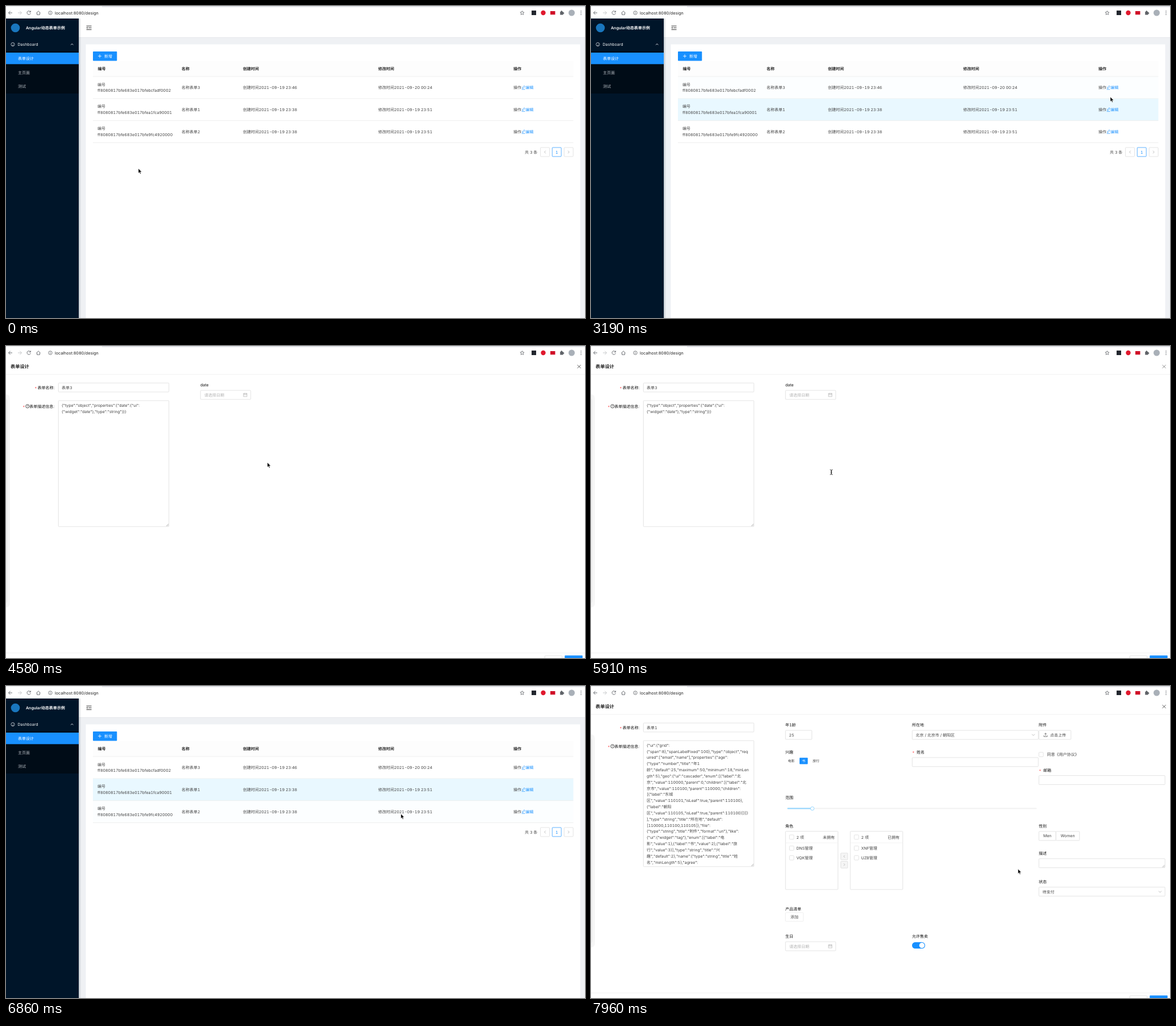
Animation, 1019 px wide and 549 px high, one loop 8 s. Source, as an HTML page:

```html
<!DOCTYPE html>
<html lang="zh-CN">
<head>
<meta charset="utf-8">
<title>表单设计</title>
<style>
html, body { margin: 0; width: 100%; height: 100%; overflow: hidden; background: #fff; }
svg { display: block; width: 100%; height: 100%; }
text {
  font-family: Inter, "Noto Sans CJK SC", "Noto Sans CJK", sans-serif;
  font-variant-numeric: tabular-nums;
  text-rendering: geometricPrecision;
  white-space: pre;
}
</style>
</head>
<body>
<svg id="stage" viewBox="0 0 1019 549"></svg>
<script>
const BLUE = '#1890ff', INK = '#111', BODY = '#444', PALE = '#b0b0b0', EDGE = '#d9d9d9';

// Drawing helpers: each returns SVG markup; text is placed by its vertical centre.
const text = (x, y, s, { fill = BODY, size = 7, weight = 400, anchor = 'start' } = {}) =>
  `<text x="${x}" y="${y + size * .36}" fill="${fill}" font-size="${size}" font-weight="${weight}" text-anchor="${anchor}">${s}</text>`;
const rect = (x, y, w, h, fill, extra = '') =>
  `<rect x="${x}" y="${y}" width="${w}" height="${h}" fill="${fill}" ${extra}/>`;
const box = (x, y, w, h, fill = '#fff', edge = EDGE) =>
  rect(x + .3, y + .3, w - .6, h - .6, fill, `stroke="${edge}" stroke-width=".7" rx="1"`);
const line = (d, stroke = '#5f6368', width = .9) =>
  `<path d="${d}" fill="none" stroke="${stroke}" stroke-width="${width}"/>`;
const circle = (x, y, r, fill, extra = '') => `<circle cx="${x}" cy="${y}" r="${r}" fill="${fill}" ${extra}/>`;
const ring = (x, y, r, stroke, width = .8) => circle(x, y, r, 'none', `stroke="${stroke}" stroke-width="${width}"`);
const group = (id, content) => `<g id="${id}">${content}</g>`;

const bold = { weight: 600, fill: '#222' };
const label = (x, y, s) => text(x, y, s, { fill: INK });
const required = (x, y, s, gap = 8) => text(x, y + 1, '*', { fill: '#ff4d4f' }) + label(x + gap, y, s);
const chevron = (x, y) => line(`M${x - 2.5} ${y - 1.3}l2.5 2.6 2.5 -2.6`, PALE, .8);
const grip = (x, y) => line(`M${x - 5} ${y - 1}l4 -4M${x - 2.8} ${y - 1}l1.8 -1.8`, '#888', .6);
const button = (x, y, w, h, s) => box(x, y, w, h) + text(x + w / 2, y + h / 2, s, { anchor: 'middle' });
const datePicker = (x, y) => box(x, y, 89, 16.5) + text(x + 7, y + 8.3, '请选择日期', { fill: PALE }) +
  rect(x + 76, y + 5.8, 6, 5.4, 'none', `stroke="${PALE}" stroke-width=".7"`) +
  line(`M${x + 76} ${y + 7.8}h6M${x + 77.5} ${y + 4.8}v2M${x + 80.5} ${y + 4.8}v2`, PALE, .7);

function browserBar() {
  const grey = '#5f6368';
  return rect(0, 0, 1019, 22, '#fff') + rect(0, 0, 169, .8, '#dee1e6') + rect(169, 0, 850, 2, '#dee1e6') +
    line('M11 12H4.5M7.7 8.8L4.5 12l3.2 3.2') +
    line('M21 12h6.5M24.3 8.8l3.2 3.2l-3.2 3.2', '#c0c2c5') +
    line('M42.8 10a3.2 3.2 0 1 0 .5 2.7M43.4 8.3v2.4h-2.6') +
    line('M53.5 12.2l3.5 -3.4 3.5 3.4M54.6 11.5v3.8h4.8v-3.8') +
    ring(78, 12, 3.2, grey) + line('M78 11.5v2.2M78 10v.8') +
    text(86, 12, 'localhost:8080/design', { size: 7.2, fill: '#222' }) +
    line('M908.4 8.6l1 2.3 2.5 .2 -1.9 1.7 .6 2.5 -2.2 -1.3 -2.2 1.3 .6 -2.5 -1.9 -1.7 2.5 -.2z', grey, .8) +
    rect(925, 8, 8, 8, '#22262e') + circle(945.5, 12, 4.2, '#e0182d') + rect(958, 9, 8.5, 6.2, '#d01028') +
    rect(975.2, 10, 5.4, 5.6, grey, 'rx=".6"') + circle(977.8, 9.6, 1.3, grey) + circle(981, 12.6, 1.3, grey) +
    circle(995.5, 12, 5.5, '#a9b0b8') +
    [9, 12, 15].map(y => circle(1012, y, .8, grey)).join('');
}

function sidebar() {
  return rect(0, 22, 128, 527, '#001529') + circle(16.5, 38.5, 7.8, '#1976bd') +
    text(35, 38.5, 'Angular动态表单示例', { fill: '#fff', weight: 600 }) +
    ring(12, 67.5, 3.1, '#d5d9dd') + line('M12 68l1.4 -1.4M10.5 69.7h3', '#d5d9dd', .7) +
    text(20.5, 67.5, 'Dashboard', { fill: '#f4f5f6' }) + line('M114.2 68.5l2 -2 2 2', '#fff') +
    rect(0, 80, 128, 74, '#000c17') + rect(0, 82, 128, 20.3, BLUE) +
    text(21, 92, '表单设计', { fill: '#fff' }) +
    text(21, 117, '主页面', { fill: '#b4bac0' }) +
    group('menuHover', text(21, 117, '主页面', { fill: '#fff' })) +
    text(21, 141.5, '测试', { fill: '#b4bac0' });
}

function tableRow([name, id, created, modified], i) {
  const top = 124.3 + i * 38.8, y = top + 19.3;
  return rect(153, top, 845.5, 38.5, '#e6f7ff', `id="row${i}"`) +
    text(161, y - 5.6, '编号') + text(161, y + 5.3, id) + text(309, y, '名称' + name) +
    text(417, y, '创建时间' + created) + text(655, y, '修改时间' + modified) + text(893, y, '操作') +
    line(`M907.5 ${y + 3.2}h6M908.5 ${y + 1.3}l.3 -1.5 3.2 -3.2 1.4 1.4 -3.2 3.2z`, BLUE, .7) +
    text(914.3, y, '编辑', { fill: BLUE }) + rect(153, top + 38.3, 845.5, .7, '#e8e8e8');
}

function listPage() {
  const rows = [
    ['表单3', 'ff8080817bfe683e017bfebcfadf0002', '2021-09-19 23:46', '2021-09-20 00:24'],
    ['表单1', 'ff8080817bfe683e017bfea1fca90001', '2021-09-19 23:38', '2021-09-19 23:51'],
    ['表单2', 'ff8080817bfe683e017bfe9fc4920000', '2021-09-19 23:38', '2021-09-19 23:51']];
  const heads = [[161.5, '编号'], [309, '名称'], [417, '创建时间'], [655, '修改时间'], [893, '操作']];
  return rect(128, 22, 891, 527, '#eff1f4') + rect(128, 22, 891, 33, '#fff') + rect(128, 55, 891, .8, '#e4e7ea') +
    line('M141.5 35.2h9M145 38.4h5.5M141.5 41.6h9', '#333', 1) +
    '<path d="M143.6 36.8v3.2l-2.2 -1.6z" fill="#333"/>' +
    rect(140.5, 67.5, 870, 482, '#fff') + rect(153, 80, 42.3, 16.4, BLUE, 'rx="1"') +
    line('M162 88.2h6M165 85.2v6', '#fff', .8) + text(173, 88.2, '新增', { fill: '#fff' }) +
    rect(153, 97, 845.5, 27, '#fdfdfd') + heads.map(([x, s]) => text(x, 110.3, s, bold)).join('') +
    rect(153, 123.7, 845.5, .7, '#e8e8e8') + rows.map(tableRow).join('') +
    text(913, 257, '共 3 条') + box(940.3, 248.7, 16.5, 16.5) + box(961, 248.7, 16.5, 16.5, '#fff', BLUE) +
    box(982, 248.7, 16.5, 16.5) + line('M949.8 254.6l-2.2 2.4 2.2 2.4', PALE, .8) +
    line('M989 254.6l2.2 2.4 -2.2 2.4', PALE, .8) +
    text(969.2, 257, '1', { fill: BLUE, anchor: 'middle' }) +
    '<rect x="128" y="22" width="4" height="527" fill="url(#shade)"/>' + sidebar();
}

const jsonLines = lines =>
  lines.map((s, i) => text(98, 104.2 + i * 10.84, s, { size: 6.9 })).join('');

const dateForm = () => text(98, 73, '表单3') +
  jsonLines(['{"type":"object","properties":{"date":{"ui":', '{"widget":"date"},"type":"string"}}}']) +
  label(342, 68.3, 'date') + datePicker(342, 77.8);

function transferList(x, title, items) {
  const check = y => box(x + 7, y - 4.3, 8.3, 8.3);
  return box(x, 255.4, 93, 103) + rect(x, 275.7, 93, .6, '#ececec') +
    check(266) + text(x + 19.5, 266, '2 项') + text(x + 87, 266, title, { anchor: 'end' }) +
    items.map((s, i) => check(285.5 + i * 17) + text(x + 19.5, 285.5 + i * 17, s)).join('');
}

function fullForm() {
  return text(98, 73, '表单1') + jsonLines([
    '{"ui":{"grid":',
    '{"span":8},"spanLabelFixed":100},"type":"object","req',
    'uired":["email","name"],"properties":{"age":',
    '{"type":"number","title":"年1',
    '龄","default":25,"maximum":50,"minimum":18,"minLen',
    'gth":5},"geo":{"ui":"cascader","enum":[{"label":"北',
    '京","value":110000,"parent":0,"children":[{"label":"北',
    '京市","value":110100,"parent":110000,"children":',
    '[{"label":"东城',
    '区","value":110101,"isLeaf":true,"parent":110100},',
    '{"label":"朝阳',
    '区","value":110105,"isLeaf":true,"parent":110100}]}]}',
    '],"type":"string","title":"所在地","default":',
    '[110000,110100,110105]},"file":',
    '{"type":"string","title":"附件","format":"uri"},"like":',
    '{"ui":{"widget":"tag"},"enum":[{"label":"电',
    '影","value":1},{"label":"书","value":2},{"label":"旅',
    '行","value":3}],"type":"string","title":"兴',
    '趣","default":2},"name":{"type":"string","title":"姓',
    '名","minLength":5},"agree":']) +
    label(342, 68.3, '年1龄') + box(342, 77.8, 47, 16.5) + text(348.5, 86, '25') +
    label(565, 68.3, '所在地') + box(565, 77.8, 222.5, 16.5) + text(571.5, 86, '北京 / 北京市 / 朝阳区') + chevron(778.5, 86) +
    label(788, 68.3, '附件') + box(788, 77.8, 57, 16.5) + text(808, 86, '点击上传') +
    line('M797 87v2h6v-2M800 87.5v-4.5M798.2 84.6l1.8 -1.8 1.8 1.8', BODY, .7) +
    label(342, 116.5, '兴趣') + text(346.5, 131.9, '电影', { size: 6 }) +
    rect(367, 126.2, 14.5, 11.3, BLUE, 'rx="1"') + text(371.2, 131.9, '书', { size: 6, fill: '#fff' }) +
    text(390, 131.9, '旅行', { size: 6 }) +
    required(565, 116.5, '姓名') + box(565, 125.6, 222.5, 16.5) +
    box(788, 116.4, 8.3, 8.3) + text(802.5, 120.5, '同意《用户协议》') +
    required(788, 148, '邮箱') + box(788, 157.3, 222.5, 16.5) +
    label(342, 196, '范围') + rect(345.5, 214.6, 439, 2, '#f2f2f2', 'rx="1"') +
    rect(345.5, 214.6, 44, 2, '#91d5ff', 'rx="1"') + circle(389.5, 215.6, 3.1, '#fff', 'stroke="#91d5ff"') +
    label(342, 246, '角色') + transferList(342, '未拥有', ['DNS管理', 'VQK管理']) +
    transferList(456, '已拥有', ['XNF管理', 'UZB管理']) +
    box(439.3, 293.6, 12.8, 12.5, '#f5f5f5') + box(439.3, 308.2, 12.8, 12.5, '#f5f5f5') +
    line('M446.6 297.8l-1.9 2 1.9 2M444.8 312.4l1.9 2 -1.9 2', PALE, .8) +
    label(788, 246, '性别') + button(788, 255.6, 30.5, 16.5, 'Men') + button(818, 255.6, 42, 16.5, 'Women') +
    label(788, 294, '描述') + box(788, 303.5, 222.5, 16.5) + grip(1010.5, 320) +
    label(788, 344, '状态') + box(788, 353.6, 222.5, 16.5) + text(794.5, 362, '待支付') + chevron(1001.5, 362) +
    label(342, 392, '产品清单') + box(342, 398.4, 32, 16, '#fff', '#e8e8e8') + text(358, 406.5, '添加', { anchor: 'middle' }) +
    label(342, 440.3, '生日') + datePicker(342, 449.7) +
    label(565, 440.3, '允许售卖') + rect(565, 450.8, 23, 11.3, BLUE, 'rx="5.6"') + circle(582.3, 456.4, 4.6, '#fff');
}

function modal() {
  return rect(-5, 21.8, 1029, 545.4, '#fff', 'rx="1.5"') + text(8, 36, '表单设计', { ...bold, size: 8.2 }) +
    line('M1005.6 33.2l6 6M1011.6 33.2l-6 6', '#000', .8).replace('<path', '<path id="close"') +
    rect(-5, 49.7, 1029, .7, '#ebebeb') + rect(-5, 539.7, 1029, .7, '#ebebeb') +
    button(948, 544.6, 31, 16.7, '取消') + rect(983.3, 544.6, 31.4, 16.7, BLUE, 'rx="1"') +
    text(998.8, 553.2, '确定', { fill: '#fff', anchor: 'middle' }) +
    required(50, 73, '表单名称:', 5.5) + box(92, 64.8, 195, 16.4) +
    text(29, 107, '*', { fill: '#ff4d4f' }) + ring(37.8, 106, 3.1, INK, .7) +
    text(37.8, 106, '?', { size: 5, fill: INK, anchor: 'middle' }) + label(41.2, 106, '表单描述信息:') +
    box(92, 95.8, 195, 222.3) + grip(287, 318) +
    group('dateForm', dateForm()) + group('fullForm', fullForm());
}

const stage = document.getElementById('stage');
stage.innerHTML = `<defs><linearGradient id="shade"><stop stop-color="#001529" stop-opacity=".2"/>
  <stop offset="1" stop-color="#001529" stop-opacity="0"/></linearGradient></defs>` +
  listPage() + rect(0, 22, 1019, 527, '#000', 'id="mask"') + group('modal', modal()) +
  group('edgeShade', rect(-10, 85, 17, 375, '#000', 'rx="7" opacity=".035"') + rect(-10, 92, 13, 361, '#000', 'rx="5" opacity=".025"')) +
  browserBar() +
  group('arrow', '<path d="M0 0v8.2l1.9 -1.7 1.3 2.9 1.3 -.6 -1.3 -2.8h2.6z" fill="#000" stroke="#fff" stroke-width=".5"/>') +
  group('beam', line('M-2.4 -4.3q2.4 0 2.4 1.2v6.2q0 1.2 -2.4 1.2M2.4 -4.3q-2.4 0 -2.4 1.2v6.2q0 1.2 2.4 1.2M-1.2 0h2.4', '#222', .9));

const el = id => document.getElementById(id);
const parts = Object.fromEntries(['menuHover', 'row0', 'row1', 'row2', 'mask', 'modal', 'close',
  'dateForm', 'fullForm', 'edgeShade', 'arrow', 'beam'].map(id => [id, el(id)]));
const ramp = (t, start, length) => Math.min(1, Math.max(0, (t - start) / length));
const fade = (t, on, off) => ramp(t, on, 300) - ramp(t, off, 300);
const opacity = (id, v) => parts[id].setAttribute('opacity', v);

// The screen refreshes about every 150 ms, in bursts of [start, end, steps].
const BURSTS = [[150, 950, 6], [1390, 2420, 8], [2570, 3480, 7], [3630, 4580, 7],
  [4730, 5770, 8], [5910, 6860, 7], [7010, 7960, 7]];
function refreshTime(t) {
  const burst = BURSTS.filter(b => b[0] <= t).pop();
  if (!burst) return 0;
  const [start, end, steps] = burst;
  return t >= end ? end : start + 150 * Math.min(steps - 2, Math.floor((t - start) / 150));
}

const POINTER = [[0, 233, 286], [150, 222, 274], [500, 120, 170], [950, 60, 108], [1390, 75, 104],
  [1900, 480, 96], [2420, 914, 138], [2570, 914, 142], [2870, 916, 172], [3020, 915, 170],
  [3170, 914, 160], [3480, 913, 141], [3780, 905, 143], [3930, 767, 158], [4580, 460, 205],
  [4730, 400, 215], [5100, 338, 226], [5770, 400, 224], [5910, 423, 222], [6060, 780, 204],
  [6360, 905, 185], [6560, 914, 179], [6710, 880, 190], [6860, 695, 225], [7160, 640, 270], [7960, 751.5, 322]];
function pointerAt(t) {
  const i = Math.max(1, POINTER.findIndex(k => k[0] >= t));
  const [a, b] = [POINTER[i - 1], POINTER[i]];
  const u = ramp(t, a[0], b[0] - a[0]);
  return [a[1] + (b[1] - a[1]) * u, a[2] + (b[2] - a[2]) * u];
}

const FIRST_OPEN = 3836, FIRST_CLOSE = 5915, SECOND_OPEN = 6920;
function draw(t) {
  opacity('menuHover', fade(t, 700, 1300));
  opacity('row0', fade(t, 2490, 2700) + fade(t, 3130, 4500));
  opacity('row1', fade(t, 2700, 3130) + fade(t, 6300, 6820));
  opacity('row2', fade(t, 6820, 7200));

  const second = t >= SECOND_OPEN;
  const opened = second ? SECOND_OPEN : FIRST_OPEN;
  const leaving = second ? 0 : ramp(t, FIRST_CLOSE, 140) ** 2;
  const shown = (1 - (1 - ramp(t, opened, 300)) ** 6) * (1 - leaving);
  const dim = second ? 1 : 1 - ramp(t, FIRST_CLOSE + 15, 180);
  const scale = .2 + .8 * shown;
  opacity('modal', shown);
  opacity('mask', .45 * ramp(t, opened, 200) * dim);
  opacity('edgeShade', ramp(shown, .98, .02));
  parts.modal.setAttribute('transform', `translate(514 289) scale(${scale}) translate(-514 -289)`);
  opacity('close', second ? .8 : .8 - .25 * ramp(t, 5000, 300));
  opacity('dateForm', second ? 0 : 1);
  opacity('fullForm', second ? 1 : 0);

  const [x, y] = pointerAt(t);
  const typing = t >= 4730 && t < 6060;
  for (const id of ['arrow', 'beam']) {
    parts[id].setAttribute('transform', `translate(${x} ${y})`);
    opacity(id, (id === 'beam') === typing ? 1 : 0);
  }
}

const began = performance.now();
function tick() {
  draw(refreshTime((performance.now() - began) % 8000));
  requestAnimationFrame(tick);
}
tick();
</script>
</body>
</html>
```
